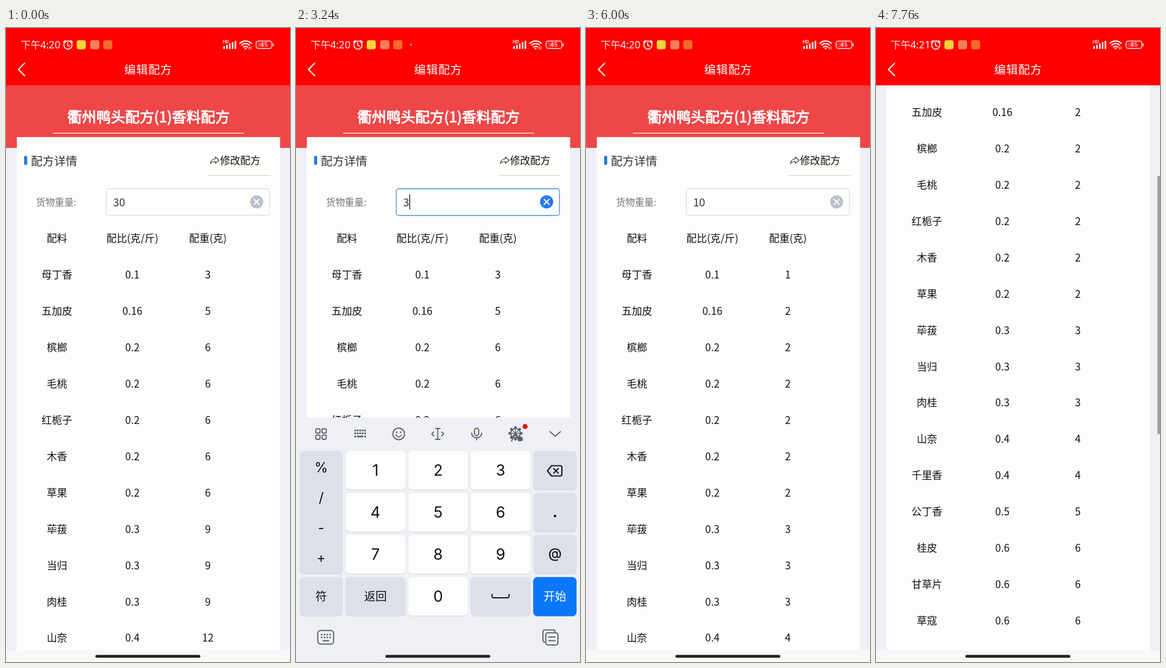
An HTML page with a canvas that plays this animation: 502 px wide and 1116 px high, repeating every 8 s.

```html
<!DOCTYPE html>
<html lang="zh-CN">
<head>
<meta charset="utf-8">
<title>编辑配方</title>
<style>
html, body { margin: 0; width: 100%; height: 100%; overflow: hidden; background: #f0eff6; }
canvas { display: block; width: 502px; height: 1116px; }
</style>
</head>
<body>
<canvas id="stage" width="502" height="1116"></canvas>
<script>
const W = 502, H = 1116, LOOP = 8000;
const ctx = document.getElementById('stage').getContext('2d');
const CJK = '"Noto Sans CJK SC", "Noto Sans CJK", sans-serif';
const UI = 'Inter, "Noto Sans CJK SC", sans-serif';
const ROW = 63.94, HEAD = 101, NAV = 1095, KEYS_TOP = 686;
const INK = '#111', ICON = '#5b6069';

const recipe = [
  ['母丁香', 0.1], ['五加皮', 0.16], ['槟榔', 0.2], ['毛桃', 0.2],
  ['红栀子', 0.2], ['木香', 0.2], ['草果', 0.2], ['荜菝', 0.3],
  ['当归', 0.3], ['肉桂', 0.3], ['山奈', 0.4], ['千里香', 0.4],
  ['公丁香', 0.5], ['桂皮', 0.6], ['甘草片', 0.6], ['草寇', 0.6]
];

// Timeline in ms
const FOCUS = 1600, BLUR = 4760, SCROLL = 6520, MINUTE = 7160;
const typed = [[0, '30'], [3120, '3'], [3680, ''], [4160, '1'], [4480, '10']];
const presses = [['del', 3000, 3160], ['del', 3560, 3720], ['1', 4040, 4160], ['0', 4360, 4480]];

const clamp = v => Math.max(0, Math.min(1, v));
const easeOut = v => 1 - Math.pow(1 - clamp(v), 3);

function rect(x, y, w, h, color) {
  ctx.fillStyle = color;
  ctx.fillRect(x, y, w, h);
}

function box(x, y, w, h, r, fill, stroke, lw = 1.3) {
  ctx.beginPath();
  ctx.roundRect(x, y, w, h, r);
  if (fill) { ctx.fillStyle = fill; ctx.fill(); }
  if (stroke) { ctx.strokeStyle = stroke; ctx.lineWidth = lw; ctx.stroke(); }
}

function dot(x, y, r, color) {
  ctx.beginPath();
  ctx.arc(x, y, r, 0, 7);
  ctx.fillStyle = color;
  ctx.fill();
}

function ring(x, y, r, color, lw, a = 0, b = Math.PI * 2) {
  ctx.beginPath();
  ctx.arc(x, y, r, a, b);
  ctx.strokeStyle = color;
  ctx.lineWidth = lw;
  ctx.stroke();
}

function path(d, color, lw) {
  ctx.strokeStyle = color;
  ctx.lineWidth = lw;
  ctx.stroke(new Path2D(d));
}

// y is the middle of the glyphs
function text(s, x, y, size, color, align = 'left', family = CJK, weight = 400) {
  ctx.font = `${weight} ${size}px ${family}`;
  ctx.textAlign = align;
  ctx.fillStyle = color;
  ctx.fillText(s, x, y + size * 0.37);
}

function statusBar(t) {
  const late = t >= MINUTE, c = '#ffeeee';
  text('下午', 26, 29.5, 17.6, c);
  text(late ? '4:21' : '4:20', 60.5, 29.5, 18, c, 'left', '"Noto Sans", sans-serif', 500);

  ctx.save();
  if (late) ctx.translate(-4, 0);
  ring(109.5, 30, 7.2, c, 1.8);
  path('M109 26V30.5L112.5 32M101.5 25L105 22M117.5 25L114 22', c, 1.8);
  box(125, 21.5, 16, 16, 4, '#f6d63a');
  box(149, 21.5, 16, 16, 4, '#f0805a');
  box(172, 21.5, 16, 16, 4, '#f46c2c');
  ctx.restore();
  if (t >= FOCUS + 200 && t < BLUR + 200) dot(203, 29.5, 1.3, c);

  text('HD', 383, 24.5, 7.5, c, 'left', UI, 700);
  for (let i = 0; i < 5; i++) {
    const h = 5 + i * 2.4;
    box(384 + i * 5, 37 - h, 3, h, 1, c);
  }
  for (let i = 0; i < 3; i++)
    ring(423.5, 37, 5 + i * 4.6, c, 2.2, -Math.PI * 0.75, -Math.PI * 0.25);
  dot(423.5, 36, 1.8, c);
  path('M430 33V37.5M433 33V37.5', c, 1.2);
  box(442, 23, 28, 13, 4, null, c, 1.5);
  box(444, 25, 11, 9, 2, 'rgba(255,255,255,.2)');
  box(471.5, 27, 1.8, 5, 1, c);
  text('45', 456, 29.6, 10.5, c, 'center', UI, 500);
}

function header(t) {
  rect(0, 0, W, HEAD, '#fe0000');
  statusBar(t);
  path('M33 62L22 73L33 84', '#fff', 1.8);
  ctx.letterSpacing = '0.8px';
  text('编辑配方', 251.4, 73, 20.4, '#fff', 'center');
  ctx.letterSpacing = '0px';
}

function field(t, value) {
  const active = t >= FOCUS && t < BLUR;
  text('货物重量:', 53, 306.5, 16.7, '#777');
  box(177.3, 283, 288.4, value ? 47 : 46, 4, '#fdfdfb', active ? '#4389dc' : '#dfdfdf');
  if (value) {
    text(value, 189.5, 307, 19, '#333');
    dot(443, 306, 11.6, active ? '#2878f2' : '#bac1cc');
    path('M438.5 301.5L447.5 310.5M447.5 301.5L438.5 310.5', '#fff', 2);
  } else {
    text('斤', 189.5, 306.5, 15.3, '#999');
  }
  if (!active) return;
  // The caret restarts its blink with every edit
  const since = typed.reduce((a, [at]) => at <= t ? Math.max(a, at) : a, FOCUS + 200);
  if ((t - since + 1200) % 1200 < 600) {
    ctx.font = `400 19px ${CJK}`;
    rect(189.7 + ctx.measureText(value).width, 293, 1.5, 26, '#222');
  }
}

function banner() {
  const title = '衢州鸭头配方(1)香料配方', size = 25.56;
  rect(0, HEAD, W, 110, '#ef4647');
  text(title, 252, 157, size, '#fff', 'center');
  // Thicken the regular weight
  ctx.strokeStyle = '#fff';
  ctx.lineWidth = 1;
  ctx.strokeText(title, 252, 157 + size * 0.37);
  rect(83, 184.6, 338, 1.2, '#fff');
}

function page(t, value, scroll) {
  rect(0, 0, W, H, '#f0eff6');
  ctx.save();
  ctx.beginPath();
  ctx.rect(0, HEAD, W, NAV - HEAD);
  ctx.clip();
  ctx.translate(0, -scroll);

  banner();
  rect(19.2, 192, 465.3, 1600, '#fdfdfb');

  box(32, 225, 5.5, 16, 2.5, '#2a76e2');
  text('配方详情', 44, 234, 20.5, '#333');
  path('M361.5 238.5C362 232.5 365 230.5 370 230.5V227L376.5 232.8L370 238.3V235C366 235 363.5 236 361.5 238.5Z', '#333', 1.2);
  text('修改配方', 378.2, 233.5, 17.9, INK);
  rect(358, 259, 110, 1, '#cfcfc6');

  field(t, value);

  const weight = t < BLUR ? 30 : 10;
  const line = (y, ...cells) => cells.forEach((s, i) =>
    text(s, 90 + i * 133.4, y, 18.1, INK, 'center'));
  line(370.5, '配料', '配比(克/斤)', '配重(克)');
  recipe.forEach(([name, ratio], i) =>
    line(434.4 + i * ROW, name, ratio, Math.round(ratio * weight)));
  ctx.restore();

  if (t >= SCROLL) rect(497.5, HEAD + scroll * 0.456, 4.5, 454, '#9b9b9d');
  rect(0, NAV, W, H - NAV, '#f8f8fa');
}

function toolbar() {
  for (const x of [35, 46])
    for (const y of [705.5, 716.5]) box(x, y, 7.5, 7.5, 2, null, ICON, 1.9);

  for (let i = 0; i < 5; i++) {
    rect(103 + i * 4.4, 707, 3, 3, ICON);
    rect(103 + i * 4.4, 712, 3, 3, ICON);
  }
  rect(103, 717.5, 3, 3, ICON);
  rect(107.5, 717.5, 11.5, 3, ICON);
  rect(120.6, 717.5, 3, 3, ICON);

  ring(181.5, 714.5, 10.3, ICON, 1.9);
  dot(178, 711.5, 1.5, ICON);
  dot(185, 711.5, 1.5, ICON);
  ring(181.5, 715, 4.8, ICON, 1.7, 0.2, Math.PI - 0.2);

  path('M246.5 705H254.5M250.5 705V724M246.5 724H254.5M243.5 711L240 714.5L243.5 718M257.5 711L261 714.5L257.5 718', ICON, 1.8);

  box(315.5, 704.5, 7.5, 13, 3.7, null, ICON, 1.9);
  path('M310.5 713C310.5 724 328 724 328 713M319.3 721V725', ICON, 1.9);

  ring(388, 713.5, 8.5, ICON, 2);
  for (let i = 0; i < 8; i++) {
    const a = i * Math.PI / 4, c = Math.cos(a), s = Math.sin(a);
    path(`M388 713.5L${388 + 9 * c} ${713.5 + 9 * s}`, ICON, 1.3);
    dot(388 + 10.5 * c, 713.5 + 10.5 * s, 2.3, ICON);
  }
  path('M388 714L381 727M388 714L394 727', ICON, 2);
  dot(397, 723.5, 4, ICON);
  dot(405, 701.5, 4.4, '#f00808');

  path('M449 710.5L458.3 718.5L467.5 710.5', ICON, 1.9);
}

function keyboard(t, shift) {
  const cols = [[6.5, 76], [87.7, 105.6], [198.5, 105.3], [308.7, 105.6], [419.5, 76.3]];
  const held = id => presses.some(([k, a, b]) => k === id && t >= a && t < b);
  const GRAY = '#dbe0e9', WHITE = '#fdfdfc', DOWN = '#d3dae4', BLUE = '#0b78fa';

  function key(col, row, fill, label, size = 27, family = UI, color = INK, h = 68) {
    const [x, w] = cols[col], y = 744.5 + row * 74;
    box(x, y + 1, w, h, 7, fill === BLUE ? BLUE : '#cfd4de');
    box(x, y, w, h, 7, fill);
    if (label) text(label, x + w / 2, y + h / 2, size, color, 'center', family);
  }

  ctx.save();
  ctx.translate(0, shift);
  rect(0, KEYS_TOP, W, H - KEYS_TOP, '#eef0f5');
  toolbar();

  key(0, 0, GRAY, '', 0, UI, INK, 216);
  ['%', '/', '-', '+'].forEach((s, i) => text(s, 44.5, 773 + i * 53, 24, INK, 'center', UI));
  for (let i = 0; i < 9; i++) {
    const d = String(i + 1);
    key(1 + i % 3, Math.floor(i / 3), held(d) ? DOWN : WHITE, d);
  }
  key(4, 0, held('del') ? '#c4ccd8' : GRAY);
  path('M451.5 770.5H467Q470 770.5 470 773.5V785.5Q470 788.5 467 788.5H451.5L444.5 779.5Z', INK, 2.1);
  path('M455.5 775.5L463.5 783.5M463.5 775.5L455.5 783.5', INK, 2.1);
  key(4, 1, GRAY);
  dot(457.8, 859, 2.2, INK);
  key(4, 2, GRAY);
  text('@', 457.7, 924.5, 24, INK, 'center', UI, 500);
  key(0, 3, GRAY, '符', 20, CJK);
  key(1, 3, GRAY, '返回', 20, CJK);
  key(2, 3, held('0') ? DOWN : WHITE, '0');
  key(3, 3, GRAY);
  path('M346.5 997V1000Q346.5 1003 349.5 1003H373.5Q376.5 1003 376.5 1000V997', INK, 2);
  key(4, 3, BLUE, '开始', 20, CJK, '#fff');

  box(38.5, 1060.5, 28, 24, 5, null, ICON, 2);
  for (let i = 0; i < 4; i++) {
    rect(44 + i * 5, 1066.5, 2.6, 2.6, ICON);
    rect(44 + i * 5, 1071.5, 2.6, 2.6, ICON);
  }
  rect(47, 1077.5, 11.5, 2.2, ICON);
  path('M440 1081Q436.5 1081 436.5 1077V1063.5Q436.5 1059.5 440.5 1059.5H454Q458 1059.5 458 1063', ICON, 2);
  box(441.5, 1064.5, 21.5, 21.5, 4, null, ICON, 2);
  path('M446.5 1072H458M446.5 1078.5H458', ICON, 2);
  ctx.restore();
}

function draw(t) {
  const value = typed.filter(([at]) => at <= t).pop()[1];
  const u = Math.max(0, t - SCROLL) / 508;
  const scroll = 351 * (1 - Math.exp(-u * u));
  const open = easeOut((t - FOCUS - 40) / 300) - easeOut((t - BLUR) / 280);

  page(t, value, scroll);
  header(t);
  if (open > 0) keyboard(t, (1 - open) * (H - KEYS_TOP));
  box(158, 1103.5, 185.5, 5, 2.5, '#222');
}

ctx.lineCap = ctx.lineJoin = 'round';
const start = performance.now();
function tick() {
  draw((performance.now() - start) % LOOP);
  requestAnimationFrame(tick);
}
tick();
</script>
</body>
</html>
```
